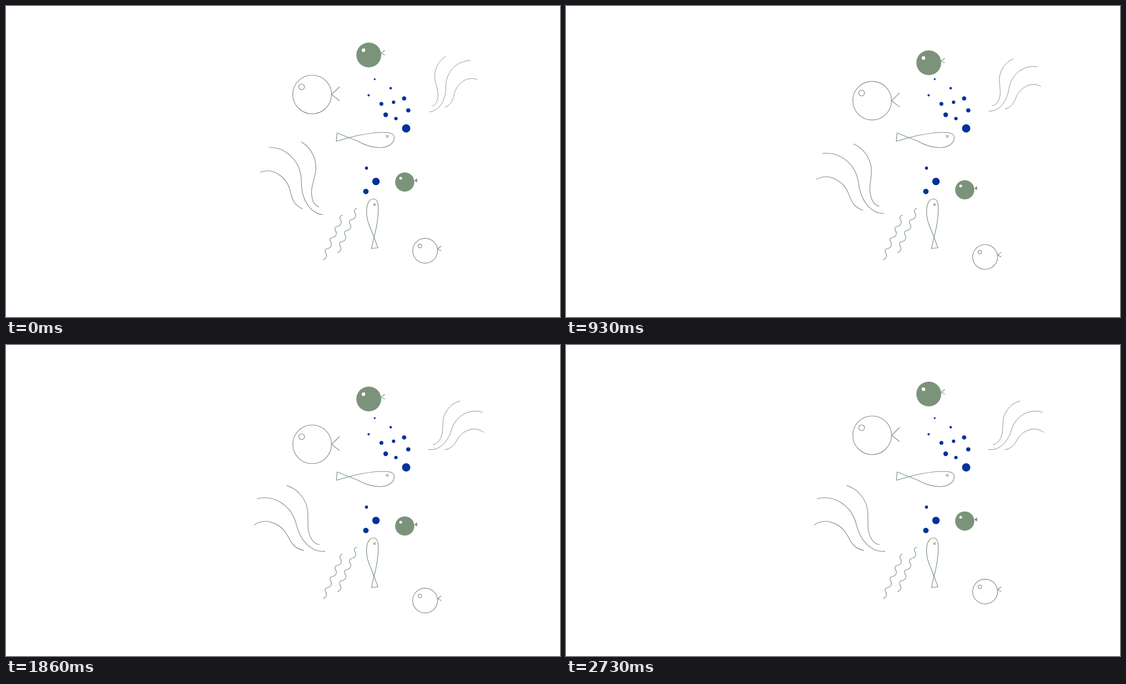
Animation of 998x561 px, one loop 3.57 s. Source, as an HTML page:

```html
<!DOCTYPE html>
<html lang="en">
<head>
<meta charset="utf-8">
<title>Fish and bubbles</title>
<style>
  html, body { margin: 0; width: 100%; height: 100%; overflow: hidden; background: #fff; }
  svg { display: block; width: 100%; height: 100%; }
  .line { fill: none; stroke: #7b937b; stroke-width: 1.15; }
  .line * { vector-effect: non-scaling-stroke; }
  .solid { fill: #7b937b; }
  .eye { fill: #fff; }
  #bubbles { fill: #003399; }
</style>
</head>
<body>
<svg viewBox="0 0 998 561">
  <defs>
    <g id="weed">
      <path d="M457.7 300C482 290 506 310 511.5 332C516 350 518 358 534 366"/>
      <path d="M474 255C505 255 532 280 532 317C532 350 548 374 571 376.5"/>
      <path d="M532 245C551 256 562 280 557 303C551.5 325 550 330 550.5 339C551.5 352 556 360 564 362.5"/>
    </g>
  </defs>

  <g class="line">
    <g id="weedLeft"><use href="#weed"/></g>
    <g id="weedRight"><use href="#weed" transform="matrix(-.762 0 0 .762 1197.7 -95.8)"/></g>

    <path d="M595 244L596.5 229L634 244C649 252.5 661 255.5 674 255.5C690 255.5 699.3 247 699.3 237.5C699.3 230 692 228 680 228C662 228 640 231.5 618 237.5Z"/>
    <circle cx="686.9" cy="235" r="1.8"/>
    <path d="M658.3 437.5L670 436L658 404C652 392 649.5 382 649.5 371C649.5 356 655 348 662 348C668 348 670.7 354 670.7 366C670.7 384 667 402 663 417Z"/>
    <circle cx="663.8" cy="358.2" r="1.6"/>
    <path id="wave1"/>
    <path id="wave2"/>

    <g id="outlined">
      <circle cx="551.5" cy="159.6" r="34.9"/>
      <circle cx="532.5" cy="145.9" r="5.2"/>
      <path d="M601 145.5L586.5 159.8L601 171"/>
      <circle cx="755" cy="441.5" r="22.4"/>
      <circle cx="745.5" cy="432.9" r="3.2"/>
      <path d="M784 433L777.3 438.2L784 441.5"/>
    </g>
  </g>

  <g id="bubbles"></g>

  <g id="filled">
    <circle class="solid" cx="653.5" cy="88.4" r="22.4"/>
    <circle class="eye" cx="644" cy="79.8" r="3.2"/>
    <path class="line" d="M682.5 80L675.8 85.2L682.5 88.5"/>
    <circle class="solid" cx="718.3" cy="317.6" r="17.3"/>
    <circle class="eye" cx="711" cy="310.7" r="2.5"/>
    <path class="solid" d="M740.6 310.8L735.4 315L740.6 318.2Z"/>
  </g>
</svg>
<script>
const LOOP = 3570, STEP = 30, END = 2730;
const el = id => document.getElementById(id);

const bubbles = [
  [664.2, 132, 1.7], [693, 148.2, 2.2], [653.3, 161, 2.1], [717.2, 166.8, 3.8],
  [698.2, 173.6, 3.1], [676.3, 176.6, 3.5], [724.7, 188.3, 3.8], [684, 196.2, 4.2],
  [702.4, 203, 3.1], [720.9, 220.8, 7.5], [649.4, 292.4, 2.8], [666.5, 316.5, 6.7],
  [648.3, 334.6, 4.9]
];
el('bubbles').innerHTML = bubbles
  .map(([x, y, r]) => `<circle cx="${x}" cy="${y}" r="${r}"/>`).join('');

const ripple = 'c-3 .3-5 2-5 4.8c0 3 2.6 4.2 2.6 7.6c0 4-3 7-6.5 7.6'.repeat(4);
el('wave1').setAttribute('d', 'M606.5 377.5' + ripple);
el('wave2').setAttribute('d', 'M632.5 365' + ripple);

// Linear rise to 1 at `peak`, then linear fall back to 0 at `end`.
const bob = (t, peak, end) => t < peak ? t / peak : (end - t) / (end - peak);
const move = (id, value) => el(id).setAttribute('transform', value);

function draw(time) {
  const t = Math.min(Math.floor(time % LOOP / STEP) * STEP, END);
  const sway = Math.min(t / 1770, 1);
  move('filled', `translate(0 ${16.65 * bob(t, 1110, 2730)})`);
  move('outlined', `translate(0 ${21.2 * bob(t, 1770, 2904)})`);
  move('weedLeft', `rotate(${-13.9 * sway} 554.3 357.3)`);
  move('weedRight', `rotate(${16.9 * sway} 771.2 183.4)`);
}

const start = performance.now();
function tick() {
  draw(performance.now() - start);
  requestAnimationFrame(tick);
}
tick();
</script>
</body>
</html>
```
